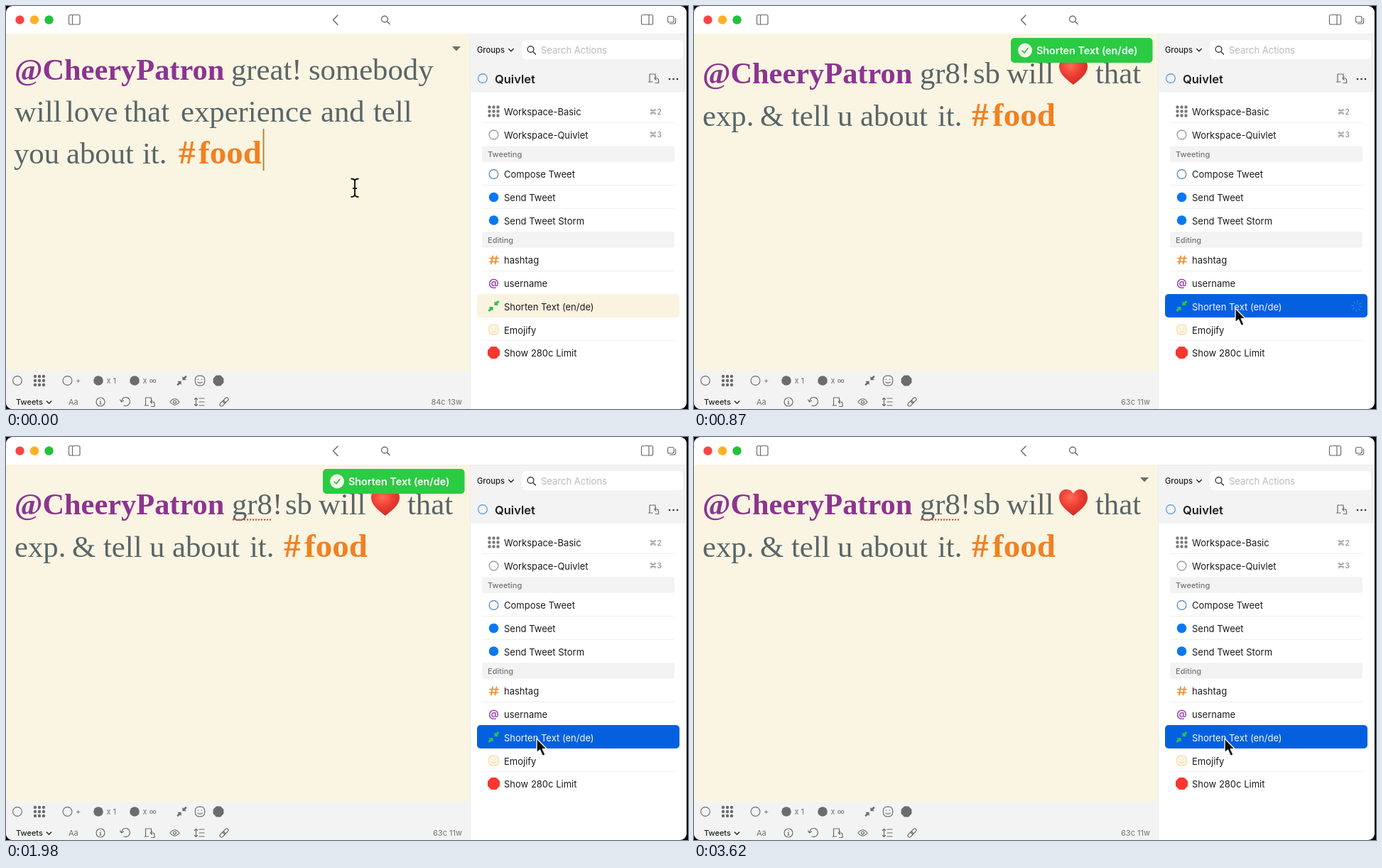
These frames come from a looping animation (960x568 px, 3.73 s). An HTML page:

```html
<!DOCTYPE html>
<html lang="en">
<head>
<meta charset="utf-8">
<title>Shorten Text</title>
<style>
html, body { margin: 0; width: 100%; height: 100%; overflow: hidden; background: #000; }
svg { display: block; }
text { font-family: Inter, "DejaVu Sans", sans-serif; white-space: pre; }
.edit text { font: 42.7px "Liberation Serif", serif; fill: #596668; }
.edit .name { font-weight: 700; font-size: 42.4px; fill: #8b3591; }
.edit .tag { font-weight: 700; font-size: 47px; fill: #f08122; }
.row text { font-size: 13px; fill: #1c1c1c; }
.row .key { font-size: 11px; fill: #868686; }
.head { font-size: 11px; font-weight: 500; fill: #757575; }
.bar text { font-size: 11px; fill: #747474; }
.line { fill: none; stroke: currentColor; stroke-width: 1.2; stroke-linecap: round; stroke-linejoin: round; }
.gray { color: #6c6c6c; }

.k { animation: 3.73s step-end infinite; }
.before { animation-name: before; }
.after { animation-name: after; }
.caret { animation-name: caret; }
.beam { animation-name: beam; }
.arrow { animation-name: arrow; }
.toast { animation-name: toast; }
.dots { animation-name: dots; }
.spin { animation-name: spin; }
.pick { animation-name: pick; }
.row .label { animation-name: label; }

@keyframes before { 0% { opacity: 1 } 23.32%, 100% { opacity: 0 } }
@keyframes after { 0% { opacity: 0 } 23.32%, 100% { opacity: 1 } }
@keyframes caret { 0% { opacity: 1 } 5.89%, 100% { opacity: 0 } }
@keyframes beam {
  0% { transform: translate(491px, 256px); opacity: 1 }
  3.21% { transform: translate(540px, 296px); opacity: 1 }
  5.89%, 100% { transform: translate(540px, 296px); opacity: 0 }
}
@keyframes arrow {
  0% { transform: translate(660px, 365px); opacity: 0 }
  5.89% { transform: translate(660px, 365px); opacity: 1 }
  9.91% { transform: translate(752px, 418px); opacity: 1 }
  12.86% { transform: translate(762px, 426px) }
  32.7% { transform: translate(760px, 426px) }
  36.72% { transform: translate(754px, 426px) }
  43.43% { transform: translate(749px, 425.5px) }
  50.13%, 100% { transform: translate(747px, 425px); opacity: 1 }
}
@keyframes toast {
  0% { opacity: 0 } 23.32% { opacity: 1 } 90.34% { opacity: .5 } 93.29%, 100% { opacity: 0 }
}
@keyframes dots { 0% { opacity: 0 } 30.02%, 100% { opacity: 1 } }
@keyframes spin {
  0% { opacity: 0 }
  16.62% { opacity: .75; transform: rotate(0) }
  19.57% { opacity: .75; transform: rotate(45deg) }
  23.32% { opacity: .2; transform: rotate(90deg) }
  30.02%, 100% { opacity: 0 }
}
@keyframes pick { 0% { fill: #faf3df } 16.62%, 100% { fill: #0560e0 } }
@keyframes label { 0% { fill: #1c1c1c } 16.62%, 100% { fill: #f4f7fd } }
</style>
</head>
<body>
<svg width="960" height="568" viewBox="0 0 960 568">
<defs>
  <clipPath id="win"><rect width="958" height="568" rx="9"/></clipPath>
  <radialGradient id="red" cx=".4" cy=".3" r=".75">
    <stop offset="0" stop-color="#ff6a56"/><stop offset=".55" stop-color="#ea3a30"/><stop offset="1" stop-color="#cf2a26"/>
  </radialGradient>
  <path id="grid" d="M-6-6h0M0-6h0M6-6h0M-6 0h0M0 0h0M6 0h0M-6 6h0M0 6h0M6 6h0" stroke="currentColor" stroke-width="4.4" stroke-linecap="round"/>
  <path id="in" d="M-1 1V7.2L-3 5.4-6.4 8.4-8.4 6.4-5.4 3-7.2 1Z" fill="currentColor"/>
  <g id="shrink"><use href="#in"/><use href="#in" transform="rotate(180)"/></g>
  <path id="stop" d="M-3.5-8.5h7l5 5v7l-5 5h-7l-5-5v-7Z" fill="currentColor"/>
  <circle id="ring" r="6.4" fill="none" stroke="currentColor" stroke-width="1.1"/>
  <circle id="disc" r="6.8" fill="currentColor"/>
  <path id="down" class="line" d="M-3.2-1.5 0 1.7 3.2-1.5" style="stroke-width:1.6"/>
  <g id="lens" class="line"><circle cx="-1" cy="-1" r="4.4"/><path d="M2.3 2.3 6 6"/></g>
  <g id="export" class="line"><path d="M2-6H-6V5H-2M-7.5 5h2M2-6V-2"/><path d="M2 6.5H6.5V2.5Q6.5 0 4 0H1M3-2 .8 0 3 2.2"/></g>
  <g id="face" class="line"><rect x="-6.6" y="-6.8" width="13.2" height="13.6" rx="5"/><path d="M-2.5-2v.6M2.5-2v.6M-3.2 1.8Q0 5 3.2 1.8"/></g>
</defs>

<g clip-path="url(#win)">
  <rect width="958" height="568" fill="#fff"/>
  <path d="M0 39.5H958" stroke="#ebebeb"/>
  <rect y="39" width="653" height="475" fill="#faf4e2"/>
  <rect y="514" width="653" height="54" fill="#f3f3f3"/>
  <rect x="653" y="40" width="303" height="81.500" fill="#f3f3f4"/>
  <path d="M653.500 40V568M956.500 40V568" stroke="#ececec"/>

  <!-- title bar -->
  <circle cx="19.500" cy="19.500" r="6.200" fill="#fb4646"/>
  <circle cx="40" cy="19.500" r="6.200" fill="#fdb124"/>
  <circle cx="60.500" cy="19.500" r="6.200" fill="#22c13c"/>
  <g class="line gray">
    <rect x="88.500" y="12.500" width="15.500" height="13.500" rx="2"/><path d="M93.500 13V26"/>
    <path d="M467 13 460.500 19.500 467 26.500" stroke-width="1.500"/>
    <rect x="894.500" y="12.500" width="16" height="13.500" rx="2"/><path d="M905 13V26"/>
    <rect x="931.500" y="14.500" width="8.500" height="8.500" rx="2"/><path d="M934.500 25H940Q942.500 25 942.500 22.500V17"/>
  </g>
  <use href="#lens" x="534" y="19.500" color="#555"/>

  <!-- editor -->
  <path d="M628 57H640L634 63.500Z" fill="#6f6e68"/>
  <g class="edit">
    <g class="k before">
      <text class="name" x="12" y="104">@CheeryPatron</text>
      <text x="317" y="104">great!</text><text x="426" y="104">somebody</text>
      <text x="12" y="163">will</text><text x="84" y="163">love</text><text x="166" y="163">that</text>
      <text x="246" y="163">experience</text><text x="443" y="163">and</text><text x="517" y="163">tell</text>
      <text x="11" y="222">you</text><text x="85" y="222">about</text><text x="192" y="222">it.</text>
      <text class="tag" x="243" y="222">#</text><text class="tag" x="271" y="222">food</text>
    </g>
    <g class="k after">
      <text class="name" x="12" y="109">@CheeryPatron</text>
      <text x="318" y="109">gr8!</text><text x="393" y="109">sb</text><text x="440" y="109">will</text><text x="565" y="109">that</text>
      <path d="M534 111C527 105 514 97 514 85C514 72 529 70 534 80C539 70 554 72 554 85C554 97 541 105 534 111Z" fill="url(#red)"/>
      <text x="12" y="169">exp.</text><text x="93" y="169">&amp;</text><text x="137" y="169">tell</text><text x="202" y="169">u</text>
      <text x="234" y="169">about</text><text x="343" y="169">it.</text>
      <text class="tag" x="391" y="169">#</text><text class="tag" x="420" y="169">food</text>
    </g>
  </g>
  <path class="k dots" d="M320 116.500H375" stroke="#dc4b43" stroke-width="2.400" stroke-linecap="round" stroke-dasharray="0 4"/>
  <rect class="k caret" x="361.500" y="173" width="2" height="59" fill="#ad8b3c"/>

  <g class="k toast">
    <rect x="446" y="45" width="199.500" height="35" rx="5" fill="#2bcb43"/>
    <circle cx="466" cy="62.500" r="10" fill="#f2f7e6"/>
    <path class="line" d="M462 63 465 66 470 59.500" color="#2bb13f" style="stroke-width:1.5"/>
    <text x="482" y="67.500" font-size="14.300" font-weight="600" fill="#fff">Shorten Text (en/de)</text>
  </g>

  <!-- bottom bars -->
  <g class="bar gray">
    <use href="#ring" x="16" y="528"/>
    <use href="#grid" x="47" y="528"/>
    <use href="#ring" x="86.500" y="528"/><text x="98" y="532">+</text>
    <use href="#disc" x="130" y="528"/><text x="141.500" y="532">x 1</text>
    <use href="#disc" x="181" y="528"/><text x="192.500" y="532">x ∞</text>
    <use href="#shrink" transform="translate(247.500 528) scale(.85)"/>
    <use href="#face" x="273" y="528"/>
    <use href="#stop" transform="translate(299 528) scale(.87)"/>
    <text x="14" y="562" style="fill:#222;font-weight:500">Tweets</text>
    <use href="#down" x="60.500" y="558.500" color="#333"/>
    <text x="88" y="562">Aa</text>
    <g class="line">
      <circle cx="133" cy="558" r="6"/><path d="M133 555v.2M132.300 557.500H133V561M132 561h2"/>
      <path d="M162.500 557A6 6 0 1 1 166 563M160.500 555 162.500 558 165.500 556"/>
      <path d="M231 558Q237.500 549.500 244 558Q237.500 566.500 231 558Z"/><circle cx="237.500" cy="558" r="2"/>
      <path d="M272 553H279M272 558H279M272 563H279M267.500 552.500V563.500M265.500 554.500 267.500 552.300 269.500 554.500M265.500 561.500 267.500 563.700 269.500 561.500"/>
      <g transform="translate(307 558) rotate(-45)"><rect x="-7.500" y="-2.300" width="8.500" height="4.600" rx="2.300"/><rect x="-1" y="-2.300" width="8.500" height="4.600" rx="2.300"/></g>
    </g>
    <use href="#export" x="202.500" y="558"/>
    <text class="k before" x="642" y="562" text-anchor="end">84c 13w</text>
    <text class="k after" x="642" y="562" text-anchor="end">63c 11w</text>
  </g>

  <!-- action list -->
  <text x="663" y="66" font-size="11.200" font-weight="500" fill="#222">Groups</text>
  <use href="#down" x="711" y="62" color="#333"/>
  <rect x="726" y="48" width="227" height="27" rx="6" fill="#fff"/>
  <use href="#lens" x="739.500" y="62" color="#222"/>
  <text x="753" y="66.500" font-size="13" fill="#b9b9b6">Search Actions</text>
  <use href="#ring" x="671" y="102" color="#4d8fe0"/>
  <text x="688" y="109" font-size="16.500" font-weight="600" fill="#1d1d1d">Quivlet</text>
  <use href="#export" x="912" y="102" class="gray"/>
  <path d="M934 103h0M939.500 103h0M945 103h0" stroke="#333" stroke-width="2.600" stroke-linecap="round"/>

  <path d="M670 164.500H941M670 252.500H941M670 285.500H941M670 373.500H941M670 471.500H941" stroke="#efefef"/>
  <rect x="670" y="197.500" width="271" height="22.500" rx="3" fill="#f3f3f3"/>
  <text class="head" x="678" y="213">Tweeting</text>
  <rect x="670" y="318" width="271" height="22.500" rx="3" fill="#f3f3f3"/>
  <text class="head" x="678" y="333.500">Editing</text>

  <rect class="k pick" x="663" y="406" width="285" height="33" rx="5"/>
  <g class="row">
    <use href="#grid" x="686.500" y="148.500" color="#777"/>
    <text x="701" y="154">Workspace-Basic</text><text class="key" x="923" y="153" text-anchor="end">⌘2</text>
    <use href="#ring" x="686.500" y="181.500" color="#8a8a8a"/>
    <text x="701" y="186.500">Workspace-Quivlet</text><text class="key" x="923" y="185" text-anchor="end">⌘3</text>
    <use href="#ring" x="686.500" y="237" color="#4a79b8"/>
    <text x="701" y="242">Compose Tweet</text>
    <use href="#disc" x="686.500" y="269.500" color="#0a78f0"/>
    <text x="701" y="275">Send Tweet</text>
    <use href="#disc" x="686.500" y="302" color="#0a78f0"/>
    <text x="701" y="307.500">Send Tweet Storm</text>
    <path class="line" d="M685 352.500 683 363.500M690.500 352.500 688.500 363.500M681 355.700H693M680.500 360.300H692.500" color="#f3902f" style="stroke-width:1.8"/>
    <text x="701" y="363">hashtag</text>
    <text x="686.500" y="395" text-anchor="middle" style="fill:#9a3fb0;font-size:14.500px;font-weight:600">@</text>
    <text x="701" y="396">username</text>
    <use href="#shrink" transform="translate(686.500 423) scale(.95)" color="#2fc04b"/>
    <text class="k label" x="701" y="428.500">Shorten Text (en/de)</text>
    <rect x="678.500" y="448.500" width="16" height="15.500" rx="4.500" fill="#fdf5e4"/>
    <use href="#face" x="686.500" y="456" color="#f3dcb0"/>
    <text x="701" y="461.500">Emojify</text>
    <use href="#stop" x="686.500" y="488.500" color="#f8372f"/>
    <text x="701" y="494">Show 280c Limit</text>
  </g>
  <g transform="translate(933 423)">
    <circle class="k spin" r="5.300" fill="none" stroke="#a9cbfa" stroke-width="4.600" pathLength="8" stroke-dasharray=".34 .66"/>
  </g>
</g>

<!-- pointers -->
<path class="k beam" d="M-5.500-12.500Q0-12.500 0-9V9.500Q0 13 -5.500 13M5.500-12.500Q0-12.500 0-9M0 9.500Q0 13 5.500 13M-3 1H3" fill="none" stroke="#111" stroke-width="1.900"/>
<path class="k arrow" d="M0 0V20L4.500 16 8.300 24.500 12 22.800 8.300 14.700H14.300Z" fill="#0c0c0c" stroke="#fff" stroke-width="1.300" stroke-linejoin="round"/>
</svg>
</body>
</html>
```
